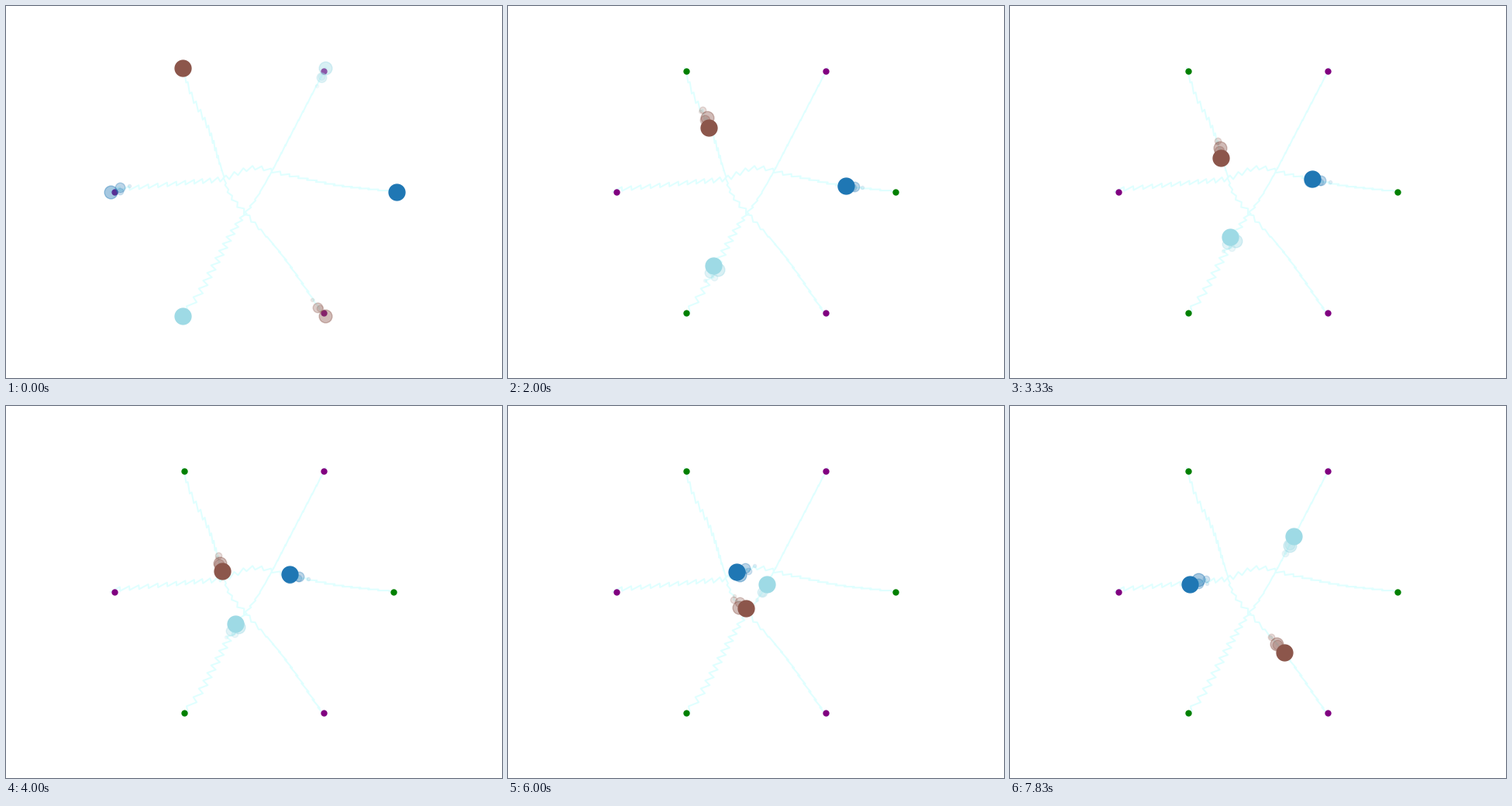
Animation of 640x480 px, one loop 8000 ms. Source, as a matplotlib script:

```python
import numpy as np
import matplotlib.pyplot as plt
from matplotlib.animation import FuncAnimation

W, H, DPI = 640, 480, 100
STEPS = 64              # positions along a whole path
LOOP_MS, TICK_MS = 8000, 50
STEPS_PER_S = 6
LEAD_MS = 34            # rounds each step to the nearest earlier tick
TRAIL = 4

# Waypoints in pixels from the top left, and the sway vector that is added
# on even steps and subtracted on odd ones (early, middle and late).
KEY_STEPS = [0, 4, 12, 24, 32, 38, 46, 63]
SWAY_STEPS = [20, 36, 46]
AGENTS = [
    ([(504, 240), (477, 237), (432, 232), (363, 218),
      (317, 209), (283, 222), (240, 227), (138, 237)],
     [(3.6, -0.4), (0.3, -3.5), (2.8, -2.8)]),
    ([(228, 80), (237, 109), (259, 153), (278, 210),
      (290, 245), (313, 272), (347, 310), (409, 397)],
     [(0, 4), (2.5, -1.5), (-3, -3)]),
    ([(228, 400), (246, 376), (269, 335), (299, 281),
      (323, 248), (341, 217), (362, 177), (411, 83)],
     [(-4.3, -0.4), (-1.1, 2.4), (-1.4, 3.3)]),
]


def spline(t, keys, values):
    """Smooth curve through the values (cubic Hermite)."""
    keys, values = np.array(keys, float), np.array(values, float)
    slopes = np.gradient(values, keys)
    i = np.clip(np.searchsorted(keys, t, side="right") - 1, 0, len(keys) - 2)
    span = keys[i + 1] - keys[i]
    u = (t - keys[i]) / span
    ease = u * u * (3 - 2 * u)
    return (values[i] * (1 - ease) + values[i + 1] * ease
            + span * u * (1 - u) * (slopes[i] * (1 - u) - slopes[i + 1] * u))


def build_path(waypoints, sways):
    n = np.arange(STEPS)
    swing = np.where(n % 2, -1, 1) * np.minimum(n / 2, 1)
    axes = [spline(n, KEY_STEPS, along) + swing * np.interp(n, SWAY_STEPS, sway)
            for along, sway in zip(zip(*waypoints), zip(*sways))]
    return np.column_stack(axes)


fig = plt.figure(figsize=(W / DPI, H / DPI), dpi=DPI, facecolor="white")
ax = fig.add_axes([0, 0, 1, 1])
ax.set(xlim=(0, W), ylim=(H, 0))
ax.axis("off")

paths = [build_path(*agent) for agent in AGENTS]
colors = plt.get_cmap("tab20")(np.linspace(0, 1, len(paths)))

for path in paths:
    ax.plot(*path.T, color="lightcyan", lw=1.5, zorder=1)

# Starts and goals alternate around a hexagon.
angles = np.radians([0, 120, 240])
for turn, color in ((0, "green"), (np.pi, "purple")):
    ax.plot(W / 2 + 180 * np.cos(angles + turn),
            H / 2 - 180 * np.sin(angles + turn),
            "o", ms=5, color=color, zorder=2)


def make_discs(color):
    """Full disc first, then the trail, smaller and fainter with age."""
    discs = []
    for age in range(TRAIL + 1):
        size = TRAIL + 1 - age
        discs += ax.plot([], [], "o", ms=3 * size, color=color,
                         alpha=0.1 * size if age else 1,
                         zorder=3 if age else 4)
    return discs


agents = [make_discs(color) for color in colors]


def draw(tick):
    step = (tick * TICK_MS + LEAD_MS) * STEPS_PER_S // 1000
    for path, discs in zip(paths, agents):
        for age, disc in enumerate(discs):
            x, y = path[(step - age) % STEPS]
            disc.set_data([x], [y])
    return sum(agents, [])


anim = FuncAnimation(fig, draw, frames=LOOP_MS // TICK_MS, interval=TICK_MS,
                     init_func=lambda: draw(0), repeat=True, repeat_delay=0)
plt.show()
```
